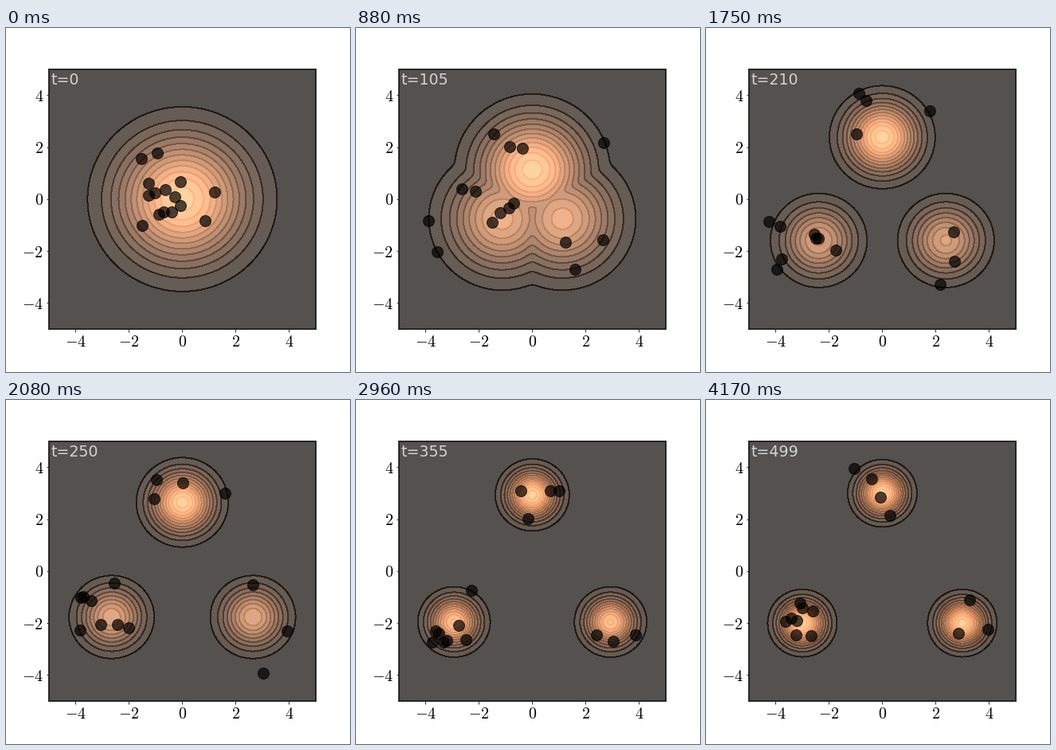
These frames come from a looping animation (432x432 px, 4210 ms). A matplotlib script:

```python
import matplotlib.pyplot as plt
import numpy as np
from matplotlib.animation import FuncAnimation

LOOP_MS = 4210
STEPS = [*range(0, 500, 5), 499]
SUB = 3                                  # drawn frames per sampling step
MODES = np.array([(0, 3), (-3, -2), (3, -2)])
VAR_START, VAR_END = 2.5, 1 / 3
LEVELS = np.arange(0, 1.05, 0.08)
JITTER = 0.05                            # variance added to a walker per step

# Opening positions, grouped by the mode each walker ends up in.
START = np.array([
    (-0.95, 1.77), (-1.28, 0.60), (-0.06, 0.66), (1.22, 0.27),
    (-1.55, 1.56), (-1.28, 0.15), (-1.02, 0.24), (-0.65, 0.36),
    (-1.50, -1.01), (-0.89, -0.58), (-0.69, -0.49), (-0.40, -0.49),
    (-0.27, 0.09), (-0.07, -0.25), (0.86, -0.83)])
HOME = MODES[np.repeat([0, 1, 2], [4, 8, 3])]

plt.rcParams["mathtext.fontset"] = "cm"


def temper(t):
    """Sigmoid annealing schedule, rescaled to run from 0 to 1."""
    sig = lambda z: 1 / (1 + np.exp(-4 * z))
    return (sig(2 * t / 499 - 1) - sig(-1)) / (sig(1) - sig(-1))


def mode_state(t):
    """Distance (as a share of the final one) and variance of each mode."""
    lam = temper(t)
    var = 1 / ((1 - lam) / VAR_START + lam / VAR_END)
    return lam * var / VAR_END, var


def walk():
    """Mean-reverting random walks around the moving modes."""
    rng = np.random.default_rng(4)
    offset = START.copy()
    path = [START]
    for t in STEPS[1:]:
        scale, var = mode_state(t)
        noise = rng.normal(0, np.sqrt(JITTER), offset.shape)
        offset = np.sqrt(1 - JITTER / var) * offset + noise
        path.append(scale * HOME + offset)
    return path


axis = np.linspace(-5, 5, 151)
X, Y = np.meshgrid(axis, axis)
log_start = -(X**2 + Y**2) / (2 * VAR_START)
log_end = np.logaddexp.reduce(
    [-((X - mx)**2 + (Y - my)**2) / (2 * VAR_END) for mx, my in MODES])
path = walk()


def density(t):
    """Geometric bridge between the two log densities, peak scaled to 1."""
    lam = temper(t)
    log_p = (1 - lam) * log_start + lam * log_end
    return np.exp(log_p - log_p.max())


fig, ax = plt.subplots(figsize=(6, 6), dpi=72)
fig.subplots_adjust(left=0.125, right=0.9, bottom=0.125, top=0.88)
ax.set(xlim=(-5, 5), ylim=(-5, 5))
ticks = range(-4, 5, 2)
names = [f"${v}$" for v in ticks]
ax.set_xticks(ticks, names, fontsize=20)
ax.set_yticks(ticks, names, fontsize=20)
ax.tick_params(axis="x", pad=3)
for spine in ax.spines.values():
    spine.set(linewidth=2, edgecolor="#262626")

dots, = ax.plot([], [], "o", color="black", ms=14, alpha=0.7, zorder=3)
label = ax.text(-4.93, 4.4, "", color="lightgray", fontsize=19,
                family="DejaVu Sans", zorder=4)
layers = []
shown = None


def draw(i):
    global shown
    k = min((i + 1) // SUB, len(STEPS) - 1)
    if k != shown:
        shown = k
        while layers:
            layers.pop().remove()
        z = density(STEPS[k])
        style = dict(levels=LEVELS, cmap="copper", alpha=0.7,
                     antialiased=False)
        layers.append(ax.contourf(X, Y, z, **style))
        layers.append(ax.contour(X, Y, z, linewidths=1, **style))
        dots.set_data(*path[k].T)
        label.set_text(f"t={STEPS[k]}")
    return layers + [dots, label]


frames = SUB * len(STEPS)
anim = FuncAnimation(fig, draw, frames=frames, init_func=lambda: [],
                     interval=LOOP_MS / frames, repeat=True,
                     repeat_delay=0, blit=False)
plt.show()
```
